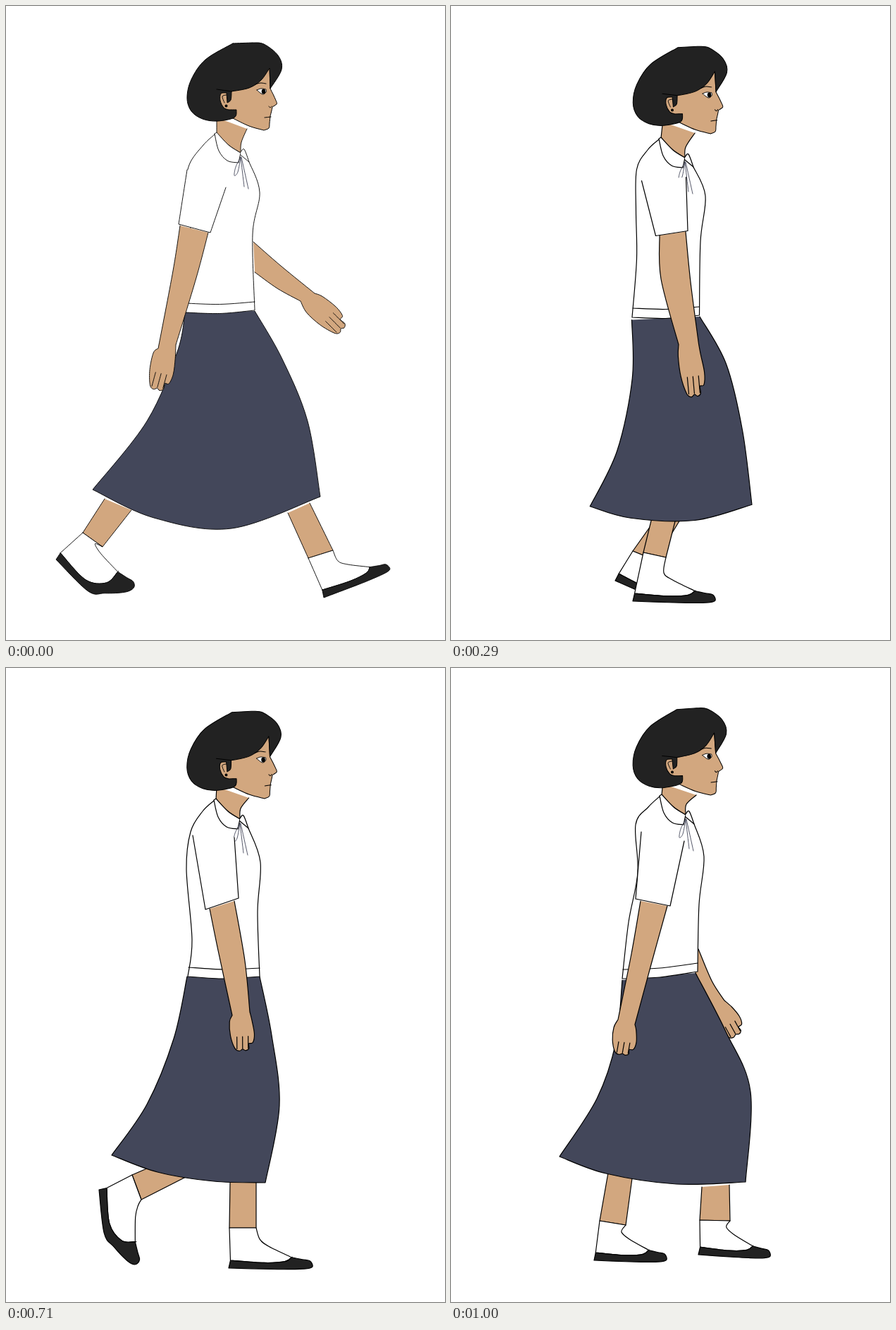
An HTML page with a canvas that plays this animation: 623x898 px, repeating every 1.14 s.

```html
<!DOCTYPE html>
<html lang="en">
<head>
<meta charset="utf-8">
<title>Walk cycle</title>
<style>
html, body { margin: 0; width: 100%; height: 100%; overflow: hidden; background: #fff; }
canvas { display: block; width: 623px; height: 898px; }
</style>
</head>
<body>
<canvas id="stage" width="623" height="898"></canvas>
<script>
const ctx = document.getElementById('stage').getContext('2d');
const SKIN = '#d2a77f', NAVY = '#43475a', DARK = '#222', WHITE = '#fff', INK = '#000';
const LOOP = 1140;
const STARTS = [0, 140, 290, 430, 570, 710, 860, 1000];

const pairs = flat => flat.flatMap((v, i) => i % 2 ? [] : [[v, flat[i + 1]]]);

// Each run is a smooth curve through its points; runs meet in corners.
function draw(fill, width, ...runs) {
  let last = null;
  ctx.beginPath();
  for (const run of runs) {
    const p = (last ? [last] : []).concat(pairs(run));
    if (!last) ctx.moveTo(...p[0]);
    for (let i = 0; i + 1 < p.length; i++) {
      const b = p[i], c = p[i + 1], a = p[i - 1] || b, d = p[i + 2] || c;
      ctx.bezierCurveTo(
        b[0] + (c[0] - a[0]) / 6, b[1] + (c[1] - a[1]) / 6,
        c[0] - (d[0] - b[0]) / 6, c[1] - (d[1] - b[1]) / 6, ...c);
    }
    last = p[p.length - 1];
  }
  if (fill) { ctx.fillStyle = fill; ctx.fill(); }
  ctx.lineWidth = width;
  ctx.stroke();
}
const polygon = (fill, width, flat) => draw(fill, width, ...pairs(flat));

// Places (share of the length, pixels to the side) along the line from a to b.
function along([ax, ay], [bx, by]) {
  const dx = bx - ax, dy = by - ay, len = Math.hypot(dx, dy);
  return (...flat) => pairs(flat).flatMap(([u, v]) =>
    [ax + u * dx + v * dy / len, ay + u * dy - v * dx / len]);
}

// torso: three points down the back, hem corners, waist, chest
// arm: outer edge, inner edge, finger tip
// leg: two points at the skirt, two at the ankle, heel, toe, bend of the sole
const strideA = {
  line: 0.9, head: [0, 0, 0], collar: [0, 0],
  torso: [260, 225, 256, 262, 263, 340, 254, 434, 353, 431, 350, 323, 360, 264],
  sleeve: [257, 232, 245, 309, 290, 321, 312, 257],
  arm: [247, 311, 237, 375, 216, 485, 241, 480, 270, 385, 287, 321, 215, 544],
  farArm: [353, 377, 385, 400, 418, 418, 438, 407, 390, 368, 351, 334, 478, 458],
  skirt: [254, 434, 243, 490, 200, 588, 123, 685, 210, 725, 320, 740, 446, 695, 428, 588, 392, 500, 353, 432],
  legs: [[140, 698, 178, 714, 109, 746, 137, 766, 71, 784, 180, 827, 24],
         [400, 718, 431, 704, 429, 782, 464, 771, 451, 838, 546, 800, 0]]
};
const lowA = {
  line: 0.9, head: [0, 9.5, -0.008], collar: [-1, 9],
  torso: [261, 236, 258, 290, 254, 360, 251, 442, 352, 440, 350, 322, 358, 270],
  sleeve: [260, 255, 263, 320, 317, 320, 322, 250],
  arm: [269, 321, 272, 400, 276, 487, 300, 487, 304, 400, 312, 321, 286, 569],
  skirt: [254, 446, 255, 530, 232, 630, 191, 706, 250, 725, 335, 729, 403, 711, 396, 610, 378, 500, 353, 441],
  legs: [[207, 710, 248, 723, 186, 725, 206, 751, 141, 740, 183, 842, 15],
         [326, 728, 358, 727, 324, 794, 358, 796, 317, 855, 427, 855, 0]]
};
const reachA = {
  line: 1.2, head: [3, 7, -0.035], collar: [-1, 5],
  torso: [266, 227, 267, 290, 273, 357, 263, 440, 353, 436, 358, 345, 364, 268],
  sleeve: [281, 240, 318, 331, 355, 317, 345, 235],
  arm: [323, 329, 324, 373, 370, 472, 403, 470, 376, 382, 354, 318, 408, 537],
  skirt: [264, 440, 264, 520, 247, 630, 216, 717, 270, 726, 380, 727, 499, 692, 467, 578, 428, 528, 353, 437],
  legs: [[368, 726, 401, 723, 362, 767, 397, 768, 359, 824, 462, 832, 0],
         [228, 721, 261, 726, 215, 774, 247, 781, 200, 843, 317, 845, 0]]
};
const strideB = {
  line: 1.2, head: [0.5, 5.5, -0.04], collar: [-2, -2],
  torso: [265, 222, 268, 295, 275, 357, 258, 428, 357, 431, 361, 315, 363, 265],
  sleeve: [281, 241, 319, 327, 358, 313, 335, 238],
  arm: [321, 327, 343, 382, 401, 467, 420, 460, 390, 393, 358, 314, 433, 520],
  farArm: [256, 300, 243, 370, 229, 483, 243, 478, 275, 357, 268, 308, 223, 528],
  farSleeve: [262, 222, 253, 299, 268, 308, 269, 260],
  skirt: [257, 428, 230, 515, 185, 605, 125, 684, 205, 720, 320, 732, 490, 703, 458, 617, 395, 523, 357, 431],
  legs: [[418, 722, 456, 714, 430, 772, 466, 762, 445, 828, 549, 797, 0],
         [143, 693, 174, 708, 114, 726, 144, 746, 81, 769, 176, 829, 24]]
};
const lowB = {
  line: 1.2, head: [0, 10, -0.02], collar: [-1, 6],
  torso: [262, 232, 256, 285, 264, 385, 258, 437, 360, 437, 357, 345, 361, 275],
  sleeve: [265, 237, 283, 342, 330, 326, 324, 240],
  arm: [289, 341, 301, 400, 321, 492, 346, 487, 339, 415, 324, 330, 337, 542],
  skirt: [257, 437, 238, 525, 200, 618, 150, 690, 215, 714, 295, 727, 368, 729, 388, 620, 377, 520, 360, 437],
  legs: [[318, 729, 355, 729, 317, 793, 355, 793, 316, 850, 435, 851, 0],
         [202, 708, 255, 721, 179, 718, 192, 753, 132, 739, 181, 846, 18]]
};
const reachB = {
  line: 1.2, head: [1.5, 6, -0.035], collar: [0, 0],
  torso: [262, 222, 265, 290, 252, 360, 243, 440, 350, 430, 352, 335, 359, 267],
  sleeve: [270, 232, 262, 327, 311, 337, 331, 245],
  arm: [269, 330, 256, 405, 237, 498, 261, 505, 284, 420, 307, 337, 244, 548],
  farArm: [347, 432, 358, 460, 372, 487, 388, 471, 370, 443, 351, 398, 406, 520],
  skirt: [243, 442, 234, 530, 207, 610, 154, 692, 220, 716, 320, 731, 418, 728, 425, 600, 390, 515, 347, 432],
  legs: [[223, 715, 257, 723, 211, 783, 248, 789, 203, 839, 306, 841, 0],
         [356, 735, 395, 732, 353, 782, 396, 783, 351, 831, 453, 836, 0]]
};

// The passing poses lie between two others; only their legs and head differ.
const mix = (a, b, k = 0.5) => a.map((v, i) => v + (b[i] - v) * k);
const shift = (leg, dx, dy = 0) => leg.map((v, i) => i > 11 ? v : v + (i % 2 ? dy : dx));
function passing(a, b, head, skirtShare, legs) {
  const pose = { line: b.line, head, legs, skirt: mix(a.skirt, b.skirt, skirtShare) };
  for (const part of ['collar', 'torso', 'sleeve', 'arm']) pose[part] = mix(a[part], b[part]);
  return pose;
}
const swing = [290, 727, 325, 728, 258, 772, 290, 785, 233, 814, 325, 843, 4];
const passA = passing(lowA, reachA, [1.5, 6, -0.02], 0.25, [swing, shift(reachA.legs[1], 58)]);
const passB = passing(lowB, reachB, [0.5, 9.5, -0.025], 0.5, [shift(reachB.legs[0], 56), shift(swing, 4, -4)]);
const POSES = [strideA, lowA, passA, reachA, strideB, lowB, passB, reachB];

function drawLeg(leg, w) {
  const [topL, topR, ankL, ankR, heel, toe] = pairs(leg);
  const bend = leg[12], at = along(heel, toe);
  polygon(SKIN, w, [...topL, ...ankL, ...ankR, ...topR]);
  const back = at(0.02, 11);
  const rim = at(0.75, 16, 0.67, 10 - bend * 0.6, 0.42, 8 - bend * 0.8, 0.02, 11);
  draw(WHITE, w, ankL, back, at(0.42, 8 - bend * 0.8, 0.67, 10 - bend * 0.6, 0.75, 16),
    [...at(0.48, 31, 0.37, 41), ...ankR], ankL);
  draw(DARK, w, back, heel, at(0.5, -1 - bend, 0.7, -1 - bend * 0.75, 0.92, -bend * 0.3, 1, 3, 0.97, 11, 0.88, 13, 0.75, 16), rim);
}

function drawArm(arm, w) {
  if (!arm) return;
  const [l0, l1, wristL, wristR, r1, r0, tip] = pairs(arm);
  const at = along(mix(wristL, wristR), tip);
  draw(SKIN, w, [...l0, ...l1, ...wristL],
    [...at(0.2, -17, 0.58, -17, 0.92, -12, 1, -6, 0.96, -1, 1, 3, 0.95, 8, 0.82, 8, 0.8, 14, 0.57, 17, 0.22, 15), ...wristR],
    [...r1, ...r0]);
  for (const v of [-8, 0, 8]) draw(null, w, at(0.62, v, 0.94, v - 1));
}

function drawTorso({ torso, collar: [x, y], line }) {
  const back = torso.slice(0, 8), [lx, ly, rx, ry] = torso.slice(6, 10);
  draw(WHITE, line, [296 + x, 182 + y, 280 + x, 197 + y, ...back],
    [(lx + rx) / 2, (ly + ry) / 2 + 3, rx, ry],
    [...torso.slice(10), 345 + x, 221 + y]);
  draw(null, line, [lx + 1, ly - 13, (lx + rx) / 2, (ly + ry) / 2 - 10, rx, ry - 12]);
}

function drawCollar({ head: [hx, hy, turn], collar: [x, y], line }) {
  draw(SKIN, line, [299 + hx, 158 + hy], [299 + x, 180 + y], [316 + x, 197 + y, 333 + x, 208 + y],
    [334 + x, 193 + y, 342 + hx - 130 * turn, 174 + hy]);
  ctx.save();
  ctx.translate(x, y);
  draw(WHITE, line, [296, 181, 302, 205, 314, 219, 330, 222], [333, 208], [316, 197, 299, 179], [296, 181]);
  draw(WHITE, line, [333, 207], [338, 203, 345, 221], [333, 211]);
  ctx.strokeStyle = NAVY;
  draw(null, 0.9, [333, 214, 326, 228, 324, 240, 329, 235, 333, 214]);
  draw(null, 0.9, [333, 214, 338, 256]);
  draw(null, 0.9, [334, 214, 344, 259]);
  ctx.restore();
}

function drawHead([dx, dy, turn]) {
  const ear = [312.5, 141.5];
  ctx.save();
  ctx.translate(ear[0] + dx, ear[1] + dy);
  ctx.rotate(turn);
  ctx.translate(-ear[0], -ear[1]);
  // face
  draw(SKIN, 1, [320, 118, 374, 86], [375, 117], [380, 127, 384, 136], [384, 139, 378, 143],
    [377, 148, 375, 156], [374, 166, 373, 173, 366, 176], [345, 170, 322, 159], [303, 148, 302, 122, 320, 118]);
  // hair
  draw(DARK, 1, [322, 53, 350, 52], [366, 54, 386, 70, 391, 90, 375, 117], [374, 88],
    [362, 105, 345, 116, 320, 121], [319, 133, 314, 137], [313, 123], [305, 124, 304, 134, 309, 144, 316, 147],
    [327, 147], [324, 158, 300, 163, 279, 160, 263, 149, 257, 130, 263, 104, 283, 76, 322, 53]);
  draw(null, 1, [299, 118, 320, 121]);
  draw(null, 0.9, [313, 126, 307, 128, 310, 137]);
  // eye, brow, nostril, mouth
  draw(WHITE, 0.9, [356, 119, 362, 117, 369, 118], [369, 122, 364, 125, 356, 119]);
  ctx.fillStyle = INK;
  ctx.beginPath();
  ctx.arc(...ear, 2, 0, 7);
  ctx.ellipse(365.5, 121, 2.8, 3.5, 0, 0, 7);
  ctx.fill();
  draw(null, 1, [354, 111, 361, 109, 369, 110]);
  draw(null, 1, [373, 142, 375, 144, 377, 142]);
  draw(null, 1, [367, 158, 376, 157]);
  ctx.restore();
}

function drawPose(pose) {
  const { line, skirt } = pose;
  ctx.fillStyle = WHITE;
  ctx.fillRect(0, 0, 623, 898);
  drawArm(pose.farArm, line);
  if (pose.farSleeve) polygon(WHITE, line, pose.farSleeve);
  for (const leg of pose.legs) drawLeg(leg, line);
  draw(NAVY, line, skirt.slice(0, 8), skirt.slice(8, 14), skirt.slice(14));
  drawTorso(pose);
  drawCollar(pose);
  drawArm(pose.arm, line);
  polygon(WHITE, line, pose.sleeve);
  drawHead(pose.head);
}

function tick() {
  const t = performance.now() % LOOP;
  drawPose(POSES[STARTS.filter(s => s <= t).length - 1]);
  requestAnimationFrame(tick);
}
ctx.lineJoin = ctx.lineCap = 'round';
ctx.strokeStyle = INK;
tick();
</script>
</body>
</html>
```
